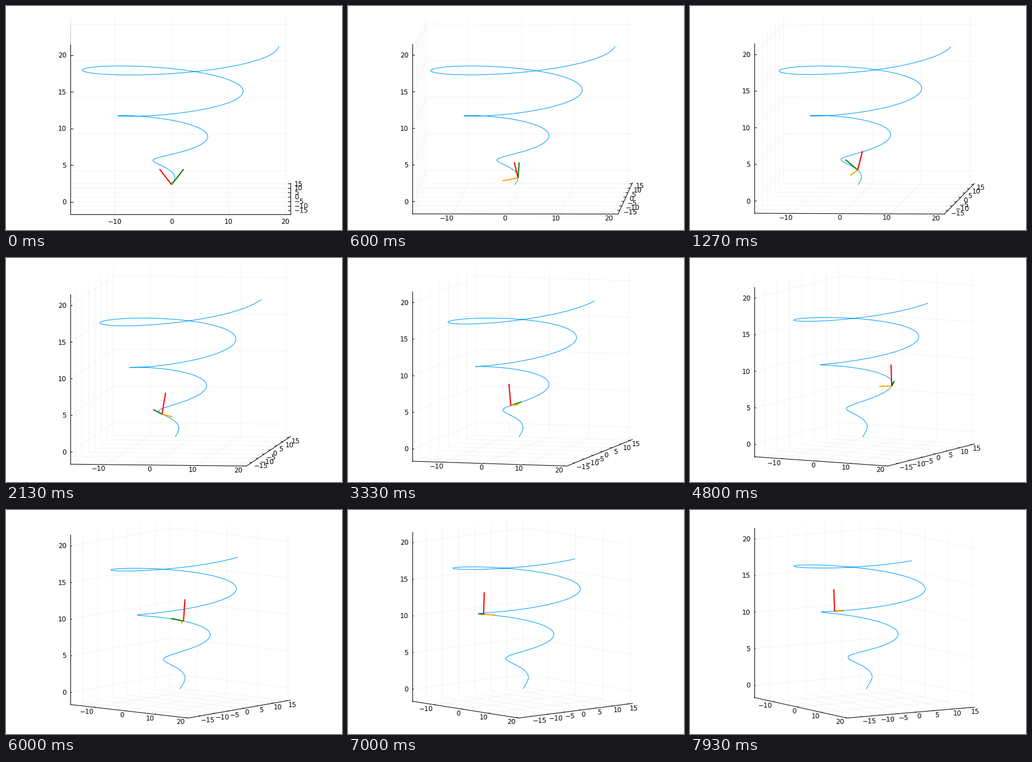
These frames come from a looping animation (600x400 px, 8000 ms). A matplotlib script:

```python
import numpy as np
import matplotlib.pyplot as plt
from matplotlib.animation import FuncAnimation
from matplotlib.collections import LineCollection

W, H, DPI = 600, 400, 100
LOOP, TICK, FPS = 8000, 20, 15     # ms, ms, steps per second
STEPS = 200                        # samples along the whole spiral
LO = np.array([-17.81, -19.2, -1.68])
HI = np.array([20.925, 16.06, 21.5])
LEFT, RIGHT, BOTTOM = 115, 508, 371.5
FLOOR, TALL = 56, 303              # vertical extents of floor and z axis
GAP, FONT = 7, 11.9
TICKS = [range(-10, 21, 10), range(-15, 16, 5), range(0, 21, 5)]


def pt(px):
    return px * 72 / DPI


def project(p, deg):
    """Map data points (..., 3) to stage pixels."""
    r = np.radians(deg)
    c, s = np.cos(r), np.sin(r)
    u, v, w = np.moveaxis((np.asarray(p, float) - LO) / (HI - LO), -1, 0)
    x = LEFT + (RIGHT - LEFT) * (c * u + s * v) / (c + s)
    y = BOTTOM - FLOOR * (s * s * (1 - u) + c * c * v) - TALL * w
    return np.stack([x, y], axis=-1)


def spiral(t):
    return np.stack([t * np.cos(t), t * np.sin(t), t], axis=-1)


def unit(v):
    return v / np.linalg.norm(v)


def frenet(t):
    c, s = np.cos(t), np.sin(t)
    d1 = np.array([c - t * s, s + t * c, 1])
    d2 = np.array([-2 * s - t * c, 2 * c - t * s, 0])
    tan, bi = unit(d1), unit(np.cross(d1, d2))
    return tan, np.cross(bi, tan), bi


def grid_lines():
    (x0, y0, z0), (x1, y1, z1) = LO, HI
    lines = []
    for x in TICKS[0]:
        lines += [[(x, y0, z0), (x, y1, z0)], [(x, y1, z0), (x, y1, z1)]]
    for y in TICKS[1]:
        lines += [[(x0, y, z0), (x1, y, z0)], [(x0, y, z0), (x0, y, z1)]]
    for z in TICKS[2]:
        lines += [[(x0, y0, z), (x0, y1, z)], [(x0, y1, z), (x1, y1, z)]]
    return np.array(lines)


def tick_starts():
    (x0, y0, z0), (x1, _, _) = LO, HI
    return [np.array([(x, y0, z0) for x in TICKS[0]]),
            np.array([(x1, y, z0) for y in TICKS[1]]),
            np.array([(x0, y0, z) for z in TICKS[2]])]


def axis_lines():
    (x0, y0, z0), (x1, y1, z1) = LO, HI
    return np.array([[(x0, y0, z0), (x1, y0, z0)],
                     [(x1, y0, z0), (x1, y1, z0)],
                     [(x0, y0, z0), (x0, y0, z1)]])


GRID, AXES, STARTS = grid_lines(), axis_lines(), tick_starts()
SPAN = 0.012 * (HI - LO)
INWARD = [SPAN * (0, 1, 0), SPAN * (-1, 0, 0), SPAN * (1, 0, 0)]
MARKS = np.concatenate([np.stack([p, p + d], axis=1)
                        for p, d in zip(STARTS, INWARD)])
CURVE = spiral(np.linspace(0, 6 * np.pi, STEPS))

fig = plt.figure(figsize=(W / DPI, H / DPI), dpi=DPI, facecolor="white")
ax = fig.add_axes([0, 0, 1, 1])
ax.set_xlim(0, W)
ax.set_ylim(H, 0)
ax.axis("off")


def lines(color, width, z, **kw):
    lc = LineCollection([], colors=color, linewidths=pt(width), zorder=z, **kw)
    ax.add_collection(lc, autolim=False)
    return lc


grid = lines("black", 0.6, 1, alpha=0.08)
frame = lines("black", 1.05, 2, capstyle="projecting")
marks = lines("black", 1.05, 2)
curve, = ax.plot([], [], color="#009AFA", lw=pt(1.05), zorder=3)
arrows = [ax.plot([], [], color=c, lw=pt(2.1), zorder=4,
                  solid_capstyle="butt")[0]
          for c in ("green", "orange", "red")]
labels = [[ax.text(0, 0, str(v).replace("-", "\u2212"), ha=ha, va="baseline",
                   family="DejaVu Sans", fontsize=pt(FONT), zorder=5)
           for v in ticks]
          for ticks, ha in zip(TICKS, ("right", "left", "right"))]


def place_labels(deg):
    for k, (texts, starts) in enumerate(zip(labels, STARTS)):
        a, b = project(AXES[k], deg)
        dx, dy = unit(b - a)
        off = GAP * np.array([-dy, dx])
        if k == 2:
            off = np.array([-GAP, 0])
        flat = k == 0 and deg == 0
        if flat:
            off = np.array([0, 13.5])
        for text, p in zip(texts, project(starts, deg)):
            text.set_position(p + off + (0, 0.364 * FONT))
            if k == 0:
                text.set_ha("center" if flat else "right")


def draw(k):
    # steps last 60 or 70 ms, so each starts on the nearest clock tick
    i = int((k * TICK + 15) * FPS / 1000)
    deg = round(i * 90 / (STEPS - 1))
    t = 6 * np.pi * i / (STEPS - 1)
    grid.set_segments(project(GRID, deg))
    frame.set_segments(project(AXES, deg))
    marks.set_segments(project(MARKS, deg))
    curve.set_data(*project(CURVE, deg).T)
    base = spiral(t)
    for arrow, v in zip(arrows, frenet(t)):
        arrow.set_data(*project([base, base + 3 * v], deg).T)
    place_labels(deg)
    return []


anim = FuncAnimation(fig, draw, frames=LOOP // TICK, init_func=lambda: draw(0),
                     interval=TICK, repeat=True, repeat_delay=0)
plt.show()
```
